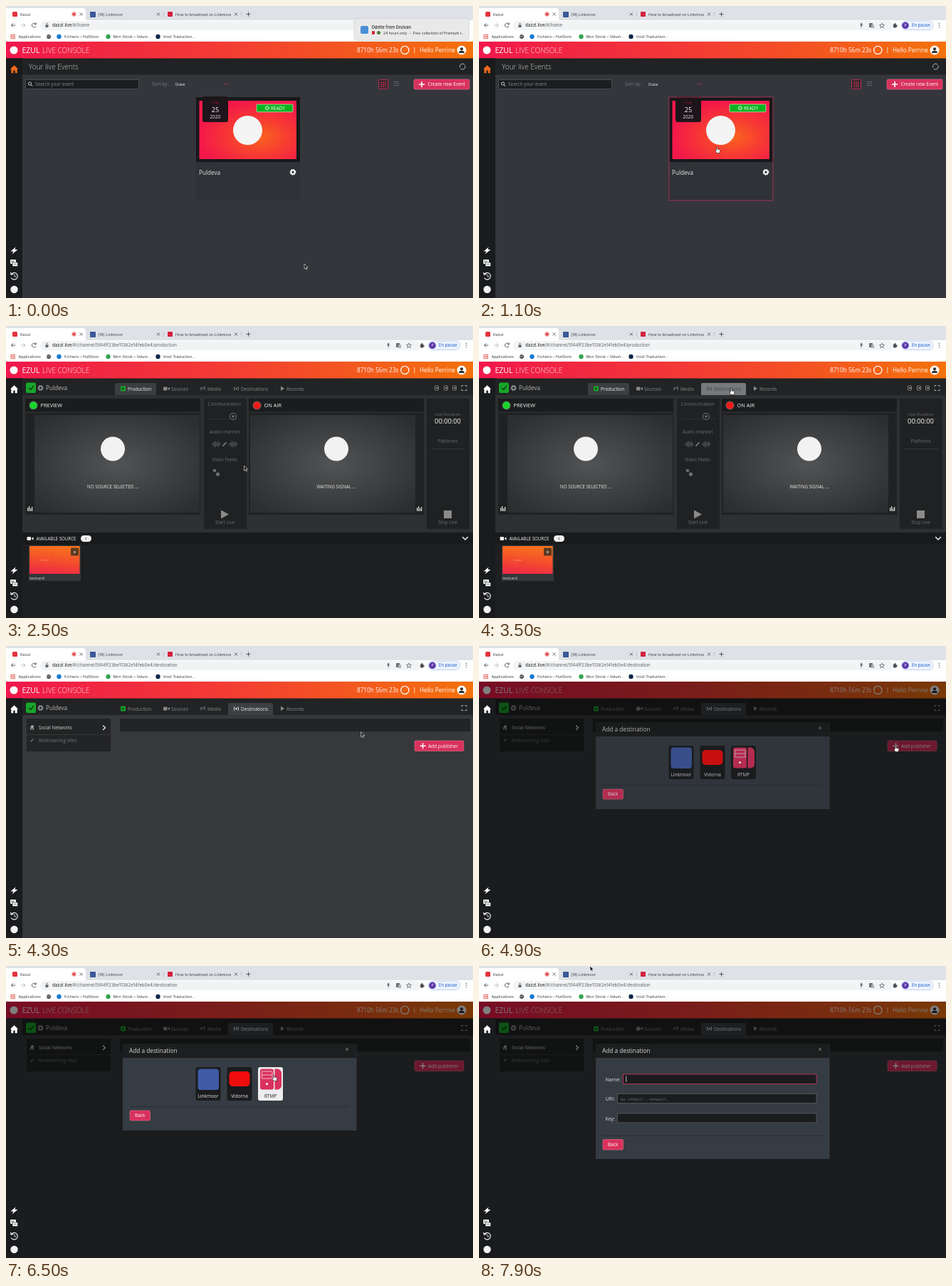
These frames come from a looping animation (656 px wide and 410 px high, 8000 ms). An HTML page:

```html
<!DOCTYPE html>
<html lang="en">
<head>
<meta charset="utf-8">
<title>Live console</title>
<style>
html, body { margin: 0; width: 100%; height: 100%; overflow: hidden; background: #1c1c1c; }
svg { display: block; width: 656px; height: 410px; }
text { font-family: "Open Sans", "Noto Sans", sans-serif; white-space: pre; }
.ui { font-family: Inter, "Liberation Sans", sans-serif; }
</style>
</head>
<body>
<svg id="stage" viewBox="0 0 656 410" xmlns="http://www.w3.org/2000/svg"></svg>
<script>
const LOOP = 8000;
const PINK = '#d9315d';

const rect = (x, y, w, h, fill, r = 0, extra = '') =>
  `<rect x="${x}" y="${y}" width="${w}" height="${h}" rx="${r}" fill="${fill}" ${extra}/>`;
const circle = (x, y, r, fill, extra = '') => `<circle cx="${x}" cy="${y}" r="${r}" fill="${fill}" ${extra}/>`;
const ring = (x, y, r, color, w = 1) => circle(x, y, r, 'none', `stroke="${color}" stroke-width="${w}"`);
const line = (d, color, w = 1) =>
  `<path d="${d}" fill="none" stroke="${color}" stroke-width="${w}" stroke-linecap="round" stroke-linejoin="round"/>`;
const shape = (d, fill, extra = '') => `<path d="${d}" fill="${fill}" ${extra}/>`;
const text = (x, y, s, size, fill, extra = '') =>
  `<text x="${x}" y="${y}" font-size="${size}" fill="${fill}" ${extra}>${s}</text>`;
const ui = (x, y, s, size = 5.4, fill = '#3c4043', extra = '') => text(x, y, s, size, fill, `class="ui" ${extra}`);
const mid = (x, y, s, size, fill, extra = '') => text(x, y, s, size, fill, `text-anchor="middle" ${extra}`);
const group = (id, body, extra = '') => `<g id="${id}" ${extra}>${body}</g>`;
const at = (x, y, body) => `<g transform="translate(${x} ${y})">${body}</g>`;
const cross = (x, y, r, color, w = .8) =>
  line(`M${x - r} ${y - r}l${2 * r} ${2 * r}m0 ${-2 * r}l${-2 * r} ${2 * r}`, color, w);
const plus = (x, y, r, color, w = 1) => line(`M${x - r} ${y}h${2 * r}M${x} ${y - r}v${2 * r}`, color, w);
const gear = (x, y, r, color) => ring(x, y, r * .6, color, r * .4) +
  circle(x, y, r * .88, 'none', `stroke="${color}" stroke-width="${r * .3}" stroke-dasharray="${r * .38} ${r * .311}"`);
const dots = (x, y, step, r, color) =>
  [0, 1, 2].map(i => [0, 1, 2].map(j => rect(x + i * step, y + j * step, r, r, color)).join('')).join('');
const bolt = (x, y, color) => at(x, y, shape('M2-5L-5 1H-1L-3 5L5-1.5H1Z', color));
const camera = (x, y, color) => rect(x, y - 2.5, 5.5, 5, color, 1) + shape(`M${x + 6} ${y}l3-2.2v4.4z`, color);
const button = (x, y, w, h, label, tx) => rect(x, y, w, h, PINK, 1.5, 'stroke="#e6728f" stroke-width=".6"') +
  text(tx, y + h / 2 + 2.3, label, 6.5, '#fff');

function browser() {
  const tab = (x, label, clipped) => ui(x, 13.5, label, 5.45, '#3c4043', clipped ? 'clip-path="url(#tabClip)"' : '');
  return rect(0, 0, 656, 21, '#dee1e6') + rect(0, 20, 656, 30, '#fff') +
    shape('M0 3H108Q112 3 112 8V17Q112 21 116 21H0Z', '#fff') +
    rect(9, 8, 7, 7, '#e6343c', 1.5) + tab(20, 'Kezul') +
    circle(95.5, 11.5, 1.7, '#e02424') + ring(95.5, 11.5, 2.7, '#e02424', .7) +
    [105.5, 214, 323].map(x => cross(x, 11.5, 1.7, '#45494d')).join('') +
    rect(118, 8, 8, 8, '#3b5998', 1) + tab(129, '(18) Linkmoor') + rect(221, 8, .5, 7, '#a4a8ad') +
    rect(227, 8, 7, 7, '#d3233c', 1) + tab(238, 'How to broadcast on Linkmoor', true) +
    rect(330, 8, .5, 7, '#a4a8ad') + plus(340.5, 11.5, 2.6, '#45494d', .9) +
    line('M13 27H7.5M10 24.5L7.5 27L10 29.5', '#4d5156', .9) +
    line('M21.5 27H27M24.5 24.5L27 27L24.5 29.5', '#b5b8bb', .9) +
    line('M42 25.5A3 3 0 1 0 42 28.5M42.3 23.8V25.8H40.2', '#4d5156', .9) +
    rect(48, 21, 534, 13, '#f1f3f4', 6.5) +
    rect(55.5, 26.5, 4, 3.5, '#5f6368', .5) + line('M56.3 26.5V25.3A1.2 1.2 0 0 1 58.7 25.3V26.5', '#5f6368', .7) +
    `<text x="65" y="29.3" font-size="6.2" class="ui" fill="#202124">dazzl.live<tspan id="path" fill="#5f6368"></tspan></text>` +
    rect(536, 24, 2.2, 4, '#5f6368', 1) + line('M535 27Q537 30 539 27M537 29V31', '#5f6368', .6) +
    rect(548, 24, 5, 6, '#6b7075', .5) + rect(551, 26, 4, 5, '#aeb2b6', .5) +
    at(566, 27.5, shape('M0-3.5L1 -1H3.5L1.5 .7L2.2 3.2L0 1.7L-2.2 3.2L-1.5 .7L-3.5-1H-1Z', 'none', 'stroke="#4d5156" stroke-width=".7"')) +
    rect(582, 25.5, 4.5, 5, '#4d5156', .7) + circle(584.2, 25.2, 1.1, '#4d5156') + circle(586.7, 28, 1.1, '#4d5156') +
    rect(593, 21, 45, 12.5, '#eef3fd', 6.2, 'stroke="#a9c3f0" stroke-width=".7"') +
    circle(599, 27.3, 4.8, '#5b36a8') + ui(599, 29.2, 'P', 5, '#fff', 'text-anchor="middle"') +
    ui(608, 29.4, 'En pause', 5.9, '#1a5fd0') +
    [24.5, 27.3, 30.1].map(y => circle(646.5, y, .7, '#4d5156')).join('') +
    dots(6.5, 39.8, 2.4, 1.6, '#e04a3c') + ui(17.5, 45, 'Applications') +
    circle(60, 43, 3, '#4d5156') + line('M57.5 42.5L60 43L62 41.5', '#fff', .6) +
    circle(74.5, 43, 3.2, '#1479d4') + ui(82, 45, 'Fichiers – HutStore') +
    circle(143.5, 43, 3.2, '#32a553') + ui(150.5, 45, 'Mon Stock – Velum...') +
    circle(213.5, 43, 3.2, '#10294a') + ui(220.5, 45, 'Voxil Traduction...');
}

const header = () => rect(0, 50, 656, 23.5, 'url(#brand)') +
  circle(11, 62, 5.5, '#fff') + text(22.5, 66, 'EZUL', 10.5, '#fff') +
  text(51, 66, 'LIVE CONSOLE', 10, '#fff', 'font-weight="300" opacity=".85"') +
  text(493, 65.2, '8710h 56m 23s', 8.2, '#fff') + ring(560.3, 62, 5.6, '#fff', 1.2) +
  rect(573.5, 58, .7, 8, '#fff') + text(581, 65.2, 'Hello Perrine', 8.2, '#fff') +
  circle(640, 62, 6.5, '#fff') + circle(640, 60.3, 2.1, '#333') + shape('M636 66Q636 62.8 640 62.8T644 66Z', '#333');

const sidebar = () => rect(0, 73.5, 23, 336.5, '#1a1b1d') +
  shape('M11.5 83.3L6 88.5H7.3V94.3H10.3V90.5H12.7V94.3H15.7V88.5H17Z', '#f26a1b', 'id="home"') +
  bolt(11.5, 343.5, '#fff') +
  rect(6, 356, 8, 6, '#fff', 1) + rect(9, 360, 7.5, 5.5, '#fff', 1, 'stroke="#1a1b1d" stroke-width=".6"') +
  line('M7.5 358H12M7.5 359.7H10M11 362.5H14.5', '#1a1b1d', .6) +
  line('M7.3 377A4.8 4.8 0 1 1 7.5 382M6.5 374.5L7.3 377.3L10 376.5', '#fff', 1.1) + line('M12 377V380H14', '#fff', .8) +
  circle(11.5, 398, 5.2, '#f2f2f2');

function eventsPage() {
  return rect(23, 73, 633, 337, '#34363b') + rect(23, 73, 633, 23.5, '#212223') +
    text(32, 89, 'Your live Events', 10, '#c9c9c9', 'font-weight="300"') +
    line('M637.5 86A4 4 0 0 1 644 82M645 84A4 4 0 0 1 639 88.5', '#bbb', 1) +
    rect(27.5, 103.5, 159, 13, '#1c1d1f', 1, 'stroke="#5c5e63" stroke-width=".7"') +
    ring(33.5, 109, 2.1, '#ddd', .9) + line('M35 110.7L37 112.7', '#ddd', 1) +
    text(41, 112.3, 'Search your event', 6.5, '#85878a') +
    text(205, 112, 'Sort by :', 6.5, '#77797c') + text(238, 112, 'Date', 6.1, '#eee') +
    line('M307 108.5L309.5 111L312 108.5', '#c43c5e', .8) +
    rect(523.5, 103.5, 13, 13, '#35262d', 1, `stroke="${PINK}" stroke-width=".8"`) + dots(526.5, 106.7, 2.8, 1.6, PINK) +
    [106, 108.5, 111].map(y => rect(545, y, 7, 1, '#5d5f64')).join('') +
    button(573, 103, 78, 14, 'Create new Event', 592.5) + plus(584, 110, 3.5, '#fff', 1.6) +
    rect(267, 128, 146, 145, '#2f3237') + rect(267, 128, 146, 91, '#17181a') +
    rect(271.5, 133, 136.5, 82, 'url(#card)') + circle(339.5, 174.5, 20.5, '#f4f4f4') +
    rect(276, 127, 36, 36, '#1c1519', 3) + mid(294, 137, 'Aug', 6, '#8c1626') +
    mid(294, 149, '25', 9.2, '#fff') + mid(293.7, 158.2, '2020', 6.5, '#eee') +
    rect(352, 138, 51, 10.8, '#0ab31e', 1.5, 'stroke="#c4efc8" stroke-width=".7"') +
    line('M365.2 141.3A2.6 2.6 0 1 0 368.8 141.3M367 140.3V143', '#fff', .9) + text(372, 145.8, 'READY', 6.5, '#fff') +
    text(271, 237.2, 'Puldeva', 8.2, '#e2e2e2') + gear(403, 233.3, 4.3, '#fff') +
    group('cardHover', rect(267, 128, 146, 145, 'none', 0, 'stroke="#b2335a" stroke-width=".9"'));
}

const loaderPage = () => rect(23, 73, 633, 337, '#1c1c1c') +
  group('spinner', line('M0 -6.5A6.5 6.5 0 0 0 0 6.5', '#b32c4e', 1.1));

function tabs(active) {
  const panel = (x, w, fill) => shape(`M${x} 97V82Q${x} 80 ${x + 2} 80H${x + w - 2}Q${x + w} 80 ${x + w} 82V97Z`, fill);
  const label = (x, s, fill = '#8a8a8a') => text(x, 90.7, s, 6.5, fill);
  const broadcast = color => circle(323.5, 88, 1.2, color) +
    line('M321 85.5Q319.5 88 321 90.5M326 85.5Q327.5 88 326 90.5', color, .9);
  const destinations = color => broadcast(color) + label(330, 'Destinations', color);
  const production = active === 'Production';
  return rect(23, 73, 633, 24, '#222324') +
    rect(28, 79.5, 14, 14.5, '#18a62a', 2) + line('M32 87L34.5 89.5L38.5 84.5', '#0b3d10', 1.4) +
    gear(48.5, 87, 4, '#8d8f91') + text(56, 89.5, 'Puldeva', 8.2, '#b5b5b5') +
    (production ? panel(153, 58, '#3b3d3f') : panel(312, 63, '#3d3f42')) +
    rect(161, 84.5, 7, 7, '#16a329', 1) + shape('M163 86.2V90L166.5 88Z', '#163a1b') +
    label(171, 'Production', production ? '#f2f2f2' : '#8a8a8a') +
    camera(221, 88, '#8a8a8a') + label(232, 'Sources') +
    line('M274 90V86L276 88L279 85V90', '#8a8a8a', .9) + label(283, 'Media') +
    destinations(production ? '#8a8a8a' : '#f2f2f2') +
    (production ? group('tabHover', panel(312, 63, '#77797b') + destinations('#414345')) : '') +
    shape('M386 84.5V91L391 87.7Z', '#8a8a8a') + label(394, 'Records') +
    line('M640 85V83.5H642M645 83.5H647V85M647 89V90.5H645M642 90.5H640V89', '#b5b5b5', .9);
}

function screen(x, barX, title, lamp, message, meterX) {
  const cx = x + 123;
  return rect(x, 102, 246, 18.5, '#1b1c1d') +
    circle(x + 11.5, 111.5, 5.5, lamp, 'stroke="#777" stroke-width=".8"') + text(x + 21.5, 114.2, title, 7.4, '#f2f2f2') +
    rect(x, 122, 246, 143, '#202122') + rect(barX, 125, 232, 137, 'url(#video)') +
    circle(cx, 172.5, 17, '#f2f2f2') + mid(cx, 228, message, 6.2, '#e8e8e8') +
    [5, 7, 4, 6].map((h, i) => rect(meterX + i * 2, 260 - h, 1.3, h, '#ccc')).join('');
}

function productionPage() {
  const dim = '#6c6e71';
  const column = (x, w) => rect(x, 102, w, 183, '#202122') + rect(x + 5, 130, w - 10, .6, '#3a3a3a');
  const wave = x => line([2, 5, 8, 4, 7, 3].map((h, i) => `M${x + i * 2} ${166 - h / 2}v${h}`).join(''), dim, .9);
  return rect(23, 73, 633, 337, '#2e2f31') + tabs('Production') +
    [605, 618, 630].map(x => rect(x - 2.5, 84, 5, 6, 'none', .5, 'stroke="#8a8a8a" stroke-width=".9"') +
      rect(x - .5, 86, 2, 2, '#a5a5a5')).join('') +
    screen(27, 40, 'PREVIEW', '#19d62c', 'NO SOURCE SELECTED ...', 30) +
    screen(341, 343, 'ON AIR', '#f01a1a', 'WAITING SIGNAL ...', 577) +
    column(278, 60) + column(591, 60) +
    mid(307, 112, 'Communication', 6.3, dim) + ring(319, 127, 4.5, dim, 1.1) + circle(319, 127, 1.7, dim) +
    mid(307, 151, 'Audio channel', 6.3, dim) + wave(290) + wave(314) + line('M305 168L309 164', dim, 2) +
    mid(307, 190, 'Video Feeds', 6.3, dim) + circle(293, 203, 2.3, dim) + circle(297.5, 208, 2.6, dim) +
    shape('M302 258.5V270.5L313 264.5Z', '#8a8a8a') + mid(307.5, 278, 'Start Live', 6.3, dim) +
    mid(620.5, 126, 'Live Duration', 5.8, dim) + mid(620.5, 137, '00:00:00', 9.3, '#fff') +
    mid(620.5, 164, 'Platforms', 6.2, dim) + rect(597, 172, 48, .6, '#444') +
    rect(615, 259, 11, 11, '#8a8a8a') + mid(620.5, 278, 'Stop Live', 6.3, dim) +
    rect(23, 290, 633, 120, '#1e1f20') + rect(23, 290, 633, 17, '#191a1b') +
    camera(29.5, 298.5, '#eee') + text(42.5, 301, 'AVAILABLE SOURCE', 6.2, '#eee') +
    rect(105, 294, 15, 9, '#eee', 4.5) + mid(112.5, 300.8, '1', 6, '#222') +
    line('M641.5 296.5L645 300L648.5 296.5', '#fff', 1.3) +
    rect(32, 308, 73, 50, '#343638') + rect(33, 309, 70.5, 39, 'url(#thumb)') +
    text(49, 330, 'testcard', 3, '#fff', 'opacity=".5"') +
    rect(91, 311.5, 11, 11, '#5c3a22', 1) + mid(96.5, 319, 'e', 6, '#fff') + text(33, 355.5, 'testcard', 5.5, '#ddd');
}

function destinationPage() {
  return rect(23, 73, 633, 337, '#36383c') + tabs('Destinations') +
    rect(29, 102, 118, 46, '#232425') + rect(29, 124, 118, .7, '#3f4042') +
    circle(36.5, 113, 1.5, '#ccc') + line('M35 117V114.5M38 117V114.5M38 112V113', '#ccc', 1.3) +
    text(46, 117, 'Social Networks', 6.3, '#d8d8d8') + line('M136.5 112L139.5 114.8L136.5 117.5', '#eee', 1.3) +
    line('M35 134L38 131', '#727478', 1.3) + text(46, 135, 'Restreaming sites', 6.5, '#727478') +
    rect(160, 102, 492, 18, '#232425') +
    button(574, 133, 69, 14.5, 'Add publisher', 593) + plus(585.5, 140.3, 3.5, '#fff', 1.5);
}

function modal() {
  const tile = (cx, label, body, name) => group(name, rect(cx - 17.5, 142, 35, 47, '#1a1b1d', 3) + body +
    mid(cx, 185, label, 6.45, '#e6e6e6'));
  const field = (x, y, h, label, lx, stroke) => text(lx, y + 9.5, label, 7, '#e0e0e0') +
    rect(x, y, 474 - x, h, '#1b1c1e', 0, `stroke="${stroke}" stroke-width=".8"`);
  const rule = y => rect(174, y, 308, .7, '#25282c');
  const frame = h => rect(164, 109, 328.5, h, '#363c43') + rect(164, 109, 328.5, 20, '#1d1e1f') +
    text(173, 121.8, 'Add a destination', 8.25, '#d9d9d9') + cross(479, 117, 1.7, '#aaa', .7);
  const server = rect(357, 144.5, 19, 29, PINK, 3) + shape('M377.5 144.5H382Q387 146 387 151V168Q387 172 382 173.5H377.5Z', PINK) +
    line('M360 148H374V158H360ZM360 153H374', '#f0c8d3', .9) + circle(366.5, 165.5, 1.6, '#fff');
  return group('choices', frame(122) +
      tile(284, 'Linkmoor', rect(269.5, 144.5, 29.5, 29.5, '#3f5ba6', 4), 'tileA') +
      tile(328, 'Vidorna', rect(313.5, 148, 29, 21, '#f20d0d', 5), 'tileB') +
      tile(371.5, 'RTMP', server, 'rtmp') +
      rule(197) + button(174, 203, 28.5, 14, 'Back', 181)) +
    group('form', frame(162) +
      field(202.5, 152, 13.5, 'Name:', 177.5, PINK) + rect(206.5, 154.5, .7, 8.5, '#fff', 0, 'id="caret"') +
      field(194.5, 179.5, 13, 'URI:', 177.5, '#5a5d62') + text(199, 188.7, 'ex : rtmp://... , rtmps://...', 6, '#74777b') +
      field(194.5, 207, 13, 'Key:', 177.5, '#5a5d62') +
      rule(238) + button(174, 243.5, 28.5, 14.5, 'Back', 181));
}

const notification = () => rect(489, 17.5, 161.5, 31.5, '#e9e9ea', 5, 'stroke="#c9cacc" stroke-width=".6"') +
  rect(498, 28, 11, 11, '#4a8fd6', 2) + ui(513.5, 31.5, 'Odette from Grulvan', 5.7, '#222', 'font-weight="500"') +
  rect(514, 35, 4, 5, '#d2263a', 1.3) + circle(523.5, 37.5, 2.5, '#4b7d3c') +
  ui(530, 39.7, '24 hours only  -  Free collection of Premium r...', 5.15, '#333');

const gradient = (id, attrs, stops, kind = 'linear') => `<${kind}Gradient id="${id}" ${attrs}>` +
  stops.map(([o, c]) => `<stop offset="${o}" stop-color="${c}"/>`).join('') + `</${kind}Gradient>`;

const stage = document.getElementById('stage');
stage.innerHTML = '<defs>' +
  gradient('brand', '', [[0, '#f0184c'], [.45, '#f33a35'], [1, '#f4720c']]) +
  gradient('card', 'cx=".62" cy=".62" r=".62"', [[0, '#f9641e'], [.5, '#f73a33'], [1, '#f3184a']], 'radial') +
  gradient('thumb', 'x1=".6" x2=".4" y2="1"', [[0, '#f7741c'], [.5, '#f4502b'], [1, '#ee2a45']]) +
  gradient('video', 'r=".65"', [[0, '#525354'], [.5, '#3f4041'], [1, '#2c2d2e']], 'radial') +
  '<clipPath id="tabClip"><path d="M236 5H316V18H236Z"/></clipPath></defs>' +
  group('events', eventsPage()) + group('loader', loaderPage()) +
  group('production', productionPage()) + group('destination', destinationPage()) +
  header() + rect(0, 50, 656, 360, '#000', 0, 'id="shade"') + sidebar() +
  group('modal', modal()) + browser() + group('notice', notification()) +
  group('arrow', shape('M0 0V7L1.7 5.5L2.8 8L4 7.5L2.9 5H5Z', '#111', 'stroke="#fff" stroke-width=".6"')) +
  group('hand', shape('M-.5 0Q.7-.5 1 .7V3L4 3.6Q5 4 4.7 5.5L4 8.5H0L-2 5.5Q-2 4.5-.5 4.8Z', '#fff', 'stroke="#111" stroke-width=".6"'));

const parts = {};
stage.querySelectorAll('[id]').forEach(el => parts[el.id] = el);

const clamp = v => Math.min(1, Math.max(0, v));
const progress = (t, start, end) => clamp((t - start) / (end - start));
const easeInOut = p => p * p * (3 - 2 * p);
const easeOut = p => 1 - (1 - p) ** 2;
const show = (id, on) => parts[id].style.display = on ? '' : 'none';
const move = (id, x, y) => parts[id].setAttribute('transform', `translate(${x} ${y})`);

const LOAD = 1500, PRODUCE = 2500, DESTINE = 3750, OPEN = 4700, FORM = 6800;
const trail = [[150, 419, 362], [1000, 334, 198], [2750, 334.5, 196], [3400, 354, 88], [3950, 354, 88],
  [4550, 585, 140], [5400, 585, 140], [6250, 376, 153], [6950, 376, 153], [7800, 156, 0]];
const pointing = [[850, LOAD], [3250, DESTINE], [4400, 5500], [6100, FORM]];
const within = (t, [start, end]) => t >= start && t < end;

function pointer(t) {
  const next = trail.findIndex(k => k[0] > t);
  if (next === 0) return trail[0].slice(1);
  if (next < 0) return trail[trail.length - 1].slice(1);
  const [a, b] = [trail[next - 1], trail[next]];
  const p = easeInOut(progress(t, a[0], b[0]));
  return [a[1] + (b[1] - a[1]) * p, a[2] + (b[2] - a[2]) * p];
}

function render(t) {
  show('events', t < LOAD);
  show('loader', within(t, [LOAD, PRODUCE]));
  show('production', within(t, [PRODUCE, DESTINE]));
  show('destination', t >= DESTINE);
  show('cardHover', t > 850);
  show('tabHover', t > 3250);
  parts.spinner.setAttribute('transform', `translate(338.5 242) rotate(${(t - 2100) * .36})`);
  parts.home.setAttribute('fill', t < PRODUCE ? '#f26a1b' : '#fff');
  parts.path.textContent = t < LOAD ? '/#/home'
    : '/#/channel/5f44ff23be11382e14feb0e4/' + (t < DESTINE ? 'production' : 'destination');

  show('notice', t < 850);
  move('notice', 175 * progress(t, 250, 850) ** 2, 0);

  const opening = progress(t, OPEN, OPEN + 250);
  parts.shade.setAttribute('opacity', .5 * progress(t, OPEN, OPEN + 150));
  show('modal', t >= OPEN);
  parts.modal.setAttribute('opacity', opening);
  move('modal', 0, -50 * (1 - easeOut(opening)));
  show('choices', t < FORM);
  show('form', t >= FORM);
  show('caret', (t - FORM) % 1000 < 500);
  const hover = within(t, [6100, FORM]);
  parts.rtmp.firstChild.setAttribute('fill', hover ? '#ececee' : '#1a1b1d');
  parts.rtmp.lastChild.setAttribute('fill', hover ? '#222' : '#e6e6e6');

  const [x, y] = pointer(t);
  const hand = pointing.some(span => within(t, span));
  show('hand', hand);
  show('arrow', !hand);
  move(hand ? 'hand' : 'arrow', x, y);
}

const start = performance.now();
function tick() {
  render((performance.now() - start) % LOOP);
  requestAnimationFrame(tick);
}
tick();
</script>
</body>
</html>
```
